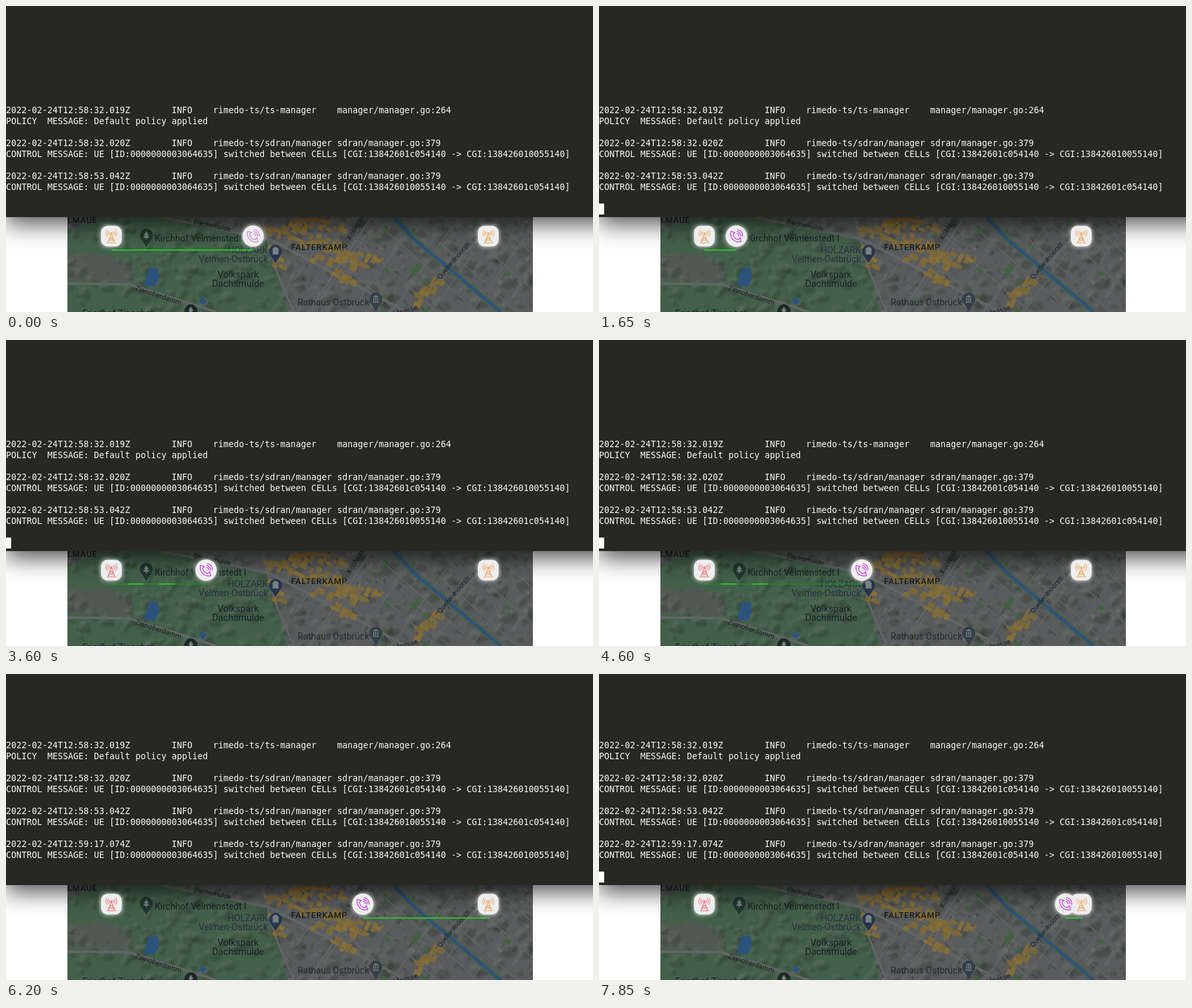
An HTML page with a canvas for the animation above (8 s loop, 908 by 474 pixels).

```html
<!DOCTYPE html>
<html lang="en">
<head>
<meta charset="utf-8">
<title>Handover demo</title>
<style>
html, body { margin: 0; width: 100%; height: 100%; overflow: hidden; background: #fff; }
canvas { position: absolute; left: 0; top: 0; }
#term {
  position: absolute; left: 0; top: 0; width: 908px; height: 327px;
  overflow: hidden; background: #272822; color: #f8f8f2;
  font: 13.3px/17px "DejaVu Sans Mono", monospace; white-space: pre;
}
#log { position: absolute; left: 0; }
#cursor { position: absolute; left: 0; top: 306px; width: 8px; height: 17px; background: #fff; }
</style>
</head>
<body>
<canvas id="stage" width="908" height="474"></canvas>
<div id="term"><div id="log"></div><div id="cursor"></div></div>
<script>
const LOOP = 8000, LOG_AT = 5350, SWITCH_AT = 5600;
const BEAT = 250, STEP = 24.25;
const LEFT = 163, RIGHT = 746, ICON_Y = 356.5, LINE_Y = 378;
const W = 908, H = 474, MAP_X = 95, MAP_Y = 327, MAP_R = 815;
const { PI, sin, cos, abs, min, floor } = Math;
const ctx = document.getElementById('stage').getContext('2d');
const log = document.getElementById('log');
const cursor = document.getElementById('cursor');

// ---------- terminal ----------
const A = '13842601c054140', B = '138426010055140';
const head = (time, mod, file) =>
  `2022-02-24T${time}Z`.padEnd(32) + 'INFO'.padEnd(8) + mod.padEnd(24) + file;
const moved = (time, from, to) => [
  head(time, 'rimedo-ts/sdran/manager', 'sdran/manager.go:379'),
  `CONTROL MESSAGE: UE [ID:0000000003064635] switched between CELLs [CGI:${from} -> CGI:${to}]`, ''
];
const before = [
  head('12:58:32.019', 'rimedo-ts/ts-manager', 'manager/manager.go:264'),
  'POLICY  MESSAGE: Default policy applied', '',
  ...moved('12:58:32.020', A, B),
  ...moved('12:58:53.042', B, A)
];
const after = [...before, ...moved('12:59:17.074', A, B)];

function showLog(lines) {
  if (log.lines === lines) return;
  log.lines = lines;
  log.style.top = 306 - lines.length * 17 + 'px';
  log.textContent = lines.join('\n');
}

// ---------- drawing helpers ----------
let seed = 11;
const rnd = (a = 0, b = 1) => {
  seed = (seed * 16807) % 2147483647;
  return a + (b - a) * seed / 2147483647;
};
function trace(c, pts) {
  c.beginPath();
  for (const [x, y] of pts) c.lineTo(x, y);
}
function line(c, color, width, ...pts) {
  trace(c, pts);
  c.strokeStyle = color;
  c.lineWidth = width;
  c.stroke();
}
function area(c, color, ...pts) {
  trace(c, pts);
  c.fillStyle = color;
  c.fill();
}
function block(c, color, x, y, w, h, turn) {
  c.save();
  c.translate(x, y);
  c.rotate(turn);
  c.fillStyle = color;
  c.fillRect(-w / 2, -h / 2, w, h);
  c.restore();
}

// ---------- map ----------
// Relief: every bump has a lit side and a shaded side.
function relief(c, n, x0, x1, size) {
  c.save();
  c.filter = 'blur(1.5px)';
  for (let i = 0; i < n; i++) {
    const x = rnd(x0, x1), y = rnd(MAP_Y, H), r = rnd(2, size), turn = rnd(-1, 1);
    for (const [d, color] of [[-r / 3, 'rgba(135,145,135,.16)'], [r / 3, 'rgba(20,28,22,.2)']]) {
      c.beginPath();
      c.ellipse(x + d, y + d, r, r * .6, turn, 0, 7);
      c.fillStyle = color;
      c.fill();
    }
  }
  c.restore();
}
function houses(c, n) {
  for (let i = 0; i < n; i++) {
    const g = rnd(74, 102);
    block(c, `rgb(${g},${g + 1},${g + 2})`, rnd(400, MAP_R), rnd(MAP_Y, H), rnd(3, 13), rnd(2, 6), .6 + (i % 2) * PI / 2);
  }
}
// A run of shop blocks scattered around a line.
function strip(c, x0, y0, x1, y1, spread, n) {
  for (let i = 0; i < n; i++) {
    const u = i / (n - 1);
    block(c, i % 3 ? '#7b683a' : '#846e3a', x0 + (x1 - x0) * u + rnd(-spread, spread),
      y0 + (y1 - y0) * u + rnd(-spread, spread), rnd(5, 15), rnd(4, 9), .45 + (i % 2) * PI / 2);
  }
}
function label(c, text, x, y, { size = 14, weight = 400, turn = 0, gap = 0, align = 'left', color = '#191d20' } = {}) {
  c.save();
  c.translate(x, y);
  c.rotate(turn * PI / 180);
  c.font = `${weight} ${size}px Roboto, sans-serif`;
  c.letterSpacing = gap + 'px';
  c.textAlign = align;
  c.fillStyle = color;
  c.fillText(text, 0, 0);
  c.restore();
}
function pin(c, x, y, color, glyph) {
  c.save();
  c.translate(x, y);
  c.beginPath();
  c.arc(0, 0, 10, PI * .85, PI * .15);
  c.quadraticCurveTo(6, 9, 0, 18);
  c.quadraticCurveTo(-6, 9, -8.9, 4.5);
  c.fillStyle = color;
  c.fill();
  const ink = '#76827f';
  c.fillStyle = c.strokeStyle = ink;
  if (glyph === 'bag') {
    c.fillRect(-4.5, -2, 9, 7);
    c.beginPath();
    c.arc(0, -2, 2.6, PI, 0);
    c.stroke();
  } else if (glyph === 'hall') {
    area(c, ink, [0, -6], [5, -3], [-5, -3]);
    for (let i = -4; i < 5; i += 3) c.fillRect(i, -2, 1.6, 5);
    c.fillRect(-5, 4, 10, 1.5);
  } else {
    area(c, ink, [0, -6], [4, 0], [-4, 0]);
    area(c, ink, [0, -2], [5, 4], [-5, 4]);
    c.fillRect(-.7, 4, 1.4, 3);
  }
  c.restore();
}

function buildMap() {
  const cv = document.createElement('canvas');
  cv.width = W;
  cv.height = H;
  const c = cv.getContext('2d');
  c.fillStyle = '#fff';
  c.fillRect(0, 0, W, H);
  c.save();
  c.beginPath();
  c.rect(MAP_X, MAP_Y, MAP_R - MAP_X, H - MAP_Y);
  c.clip();
  c.fillStyle = '#595b5c';
  c.fillRect(MAP_X, MAP_Y, MAP_R, H);

  houses(c, 420);
  area(c, '#43604a', [95, 348], [150, 327], [285, 327], [405, 364], [436, 474], [95, 474]);
  area(c, '#505a53', [95, 385], [150, 383], [200, 402], [190, 428], [95, 425]);
  relief(c, 190, MAP_X, 430, 10);
  relief(c, 110, 420, MAP_R, 13);
  for (let i = 0; i < 16; i++)
    block(c, '#40613f', rnd(450, MAP_R), rnd(MAP_Y, H), rnd(5, 14), rnd(4, 9), rnd(0, 2));

  // streets
  const street = '#626566';
  for (let x = 440; x < 800; x += 62) {
    line(c, street, 1.5, [x, MAP_Y], [x + 165, H]);
    line(c, street, 1.5, [x + 75, MAP_Y], [x - 30, H]);
  }
  line(c, street, 4, [240, 327], [407, 361], [620, 474]);
  line(c, street, 4, [95, 430], [190, 431], [325, 474]);
  line(c, street, 3, [395, 327], [418, 410], [445, 474]);
  line(c, street, 3, [565, 327], [468, 474]);
  line(c, street, 3, [735, 357], [622, 474]);

  // shops
  strip(c, 408, 350, 432, 350, 5, 8);
  strip(c, 412, 380, 423, 402, 6, 9);
  strip(c, 432, 343, 545, 398, 11, 48);
  strip(c, 445, 338, 520, 345, 5, 13);
  strip(c, 480, 388, 582, 398, 8, 20);
  strip(c, 512, 412, 535, 428, 6, 10);
  strip(c, 632, 456, 668, 428, 7, 15);
  line(c, '#8a5f2c', 5, [442, 335], [472, 330], [503, 335]);

  // water
  const water = '#2c527c', canal = [[600, 327], [630, 360], [765, 474]];
  area(c, water, [221, 406], [235, 406], [237, 422], [229, 435], [213, 433]);
  area(c, water, [301, 451], [312, 457], [305, 463], [299, 459]);
  line(c, '#4a5f4c', 9, ...canal);
  line(c, water, 4.5, ...canal);

  const shop = { align: 'right', color: '#272d40' };
  const park = { align: 'center', size: 14.5 };
  label(c, 'LMAUE', 95, 336, { size: 13, weight: 500, gap: .6 });
  label(c, 'Dachsmulde', 290, 338, { size: 10.5, turn: 11 });
  label(c, 'Kirchhof Velmenstedt I', 230, 365);
  label(c, 'HOLZARK', 405, 383, shop);
  label(c, 'Velmen-Ostbrück', 405, 397, shop);
  label(c, 'Volkspark', 359, 421, park);
  label(c, 'Dachsmulde', 359, 435, park);
  label(c, 'FALTERKAMP', 441, 378, { size: 13, weight: 500, gap: .7 });
  label(c, 'Rathaus Ostbrück', 451, 464, { color: '#23292d' });
  label(c, 'Zinnoberdamm', 199, 440, { size: 11, turn: 18 });
  label(c, 'Quellenmoorstr.', 672, 424, { size: 10.5, turn: -50 });
  label(c, 'Köblerstr.', 533, 363, { size: 11, turn: -60 });
  label(c, 'Torfgasse', 590, 484, { size: 11, turn: -16 });
  label(c, 'Friedhof Zinnober', 118, 481);

  pin(c, 217, 355, '#1f3730', 'tree');
  pin(c, 417, 380, '#26344f', 'bag');
  pin(c, 572, 454, '#343e47', 'hall');
  pin(c, 286, 472, '#1d2926', 'tree');
  c.restore();

  // window shadow
  c.shadowColor = 'rgba(0,0,0,.7)';
  c.shadowBlur = 34;
  c.shadowOffsetY = 10;
  c.fillStyle = '#272822';
  c.fillRect(0, 0, W + 60, MAP_Y);
  return cv;
}

// ---------- markers ----------
function badge(x, r, corner) {
  ctx.save();
  ctx.translate(x, ICON_Y);
  ctx.shadowColor = '#f4f4f4';
  ctx.shadowBlur = 7;
  ctx.fillStyle = '#eeeeee';
  ctx.beginPath();
  ctx.roundRect(-r, -r, r * 2, r * 2, corner);
  ctx.fill();
  ctx.shadowBlur = 0;
  ctx.lineCap = ctx.lineJoin = 'round';
}
function arc(x, y, r, a, b) {
  ctx.beginPath();
  ctx.arc(x, y, r, a, b);
  ctx.stroke();
}
function tower(x, color) {
  badge(x, 16, 10);
  line(ctx, color, 1.1, [-5.5, 10], [0, -4], [5.5, 10]);
  for (const s of [-1, 1]) {
    line(ctx, color, 1, [s * 1.8, 1], [-s * 3.2, 4.5], [s * 4.6, 8]);
    for (const r of [3.5, 6, 8.5]) arc(0, -4.5, r, PI / 2 - s * PI / 2 - .65, PI / 2 - s * PI / 2 + .65);
  }
  line(ctx, color, 1, [-7, 10.3], [7, 10.3]);
  ctx.fillStyle = color;
  ctx.beginPath();
  ctx.arc(0, -4.5, 1.5, 0, 7);
  ctx.fill();
  ctx.restore();
}
// Handset: a curved band that thickens towards both ends.
function handset() {
  const n = 24, outer = [], inner = [];
  for (let i = 0; i <= n; i++) {
    const u = i / n, a = (75 + 120 * u) * PI / 180, thick = 3.5 + 3 * abs(2 * u - 1) ** 4;
    const at = r => [4 + r * cos(a), -4 + r * sin(a)];
    outer.push(at(13));
    inner.unshift(at(13 - thick));
  }
  return [...outer, ...inner, outer[0]];
}
const receiver = handset();
function phone(x, color) {
  badge(x, 16.5, 16.5);
  line(ctx, color, 1.3, ...receiver);
  for (const r of [3.2, 6.2, 9.2]) arc(.5, -1, r, -1.45, .12);
  ctx.restore();
}

// ---------- timeline ----------
const map = buildMap();

// Beats counted from the hop at 950 ms; the first ones run slightly fast.
const hop = t => floor((t - 950 + min(100, t / 20)) / BEAT);

function link(x0, x1, color) {
  if (x1 > x0) line(ctx, color, 2, [x0, LINE_Y], [x1, LINE_Y]);
}
function cursorOn(t) {
  return t < LOG_AT ? t >= 550 : floor((t - LOG_AT) / 600) % 2 === 0;
}
function draw(t) {
  const k = hop(t), back = k >= 5;
  const x = LEFT + 1 + STEP * abs(k - 5);
  const bright = '#2bc22b';
  ctx.drawImage(map, 0, 0);

  if (t >= SWITCH_AT) {
    link(x, RIGHT + 2, bright);
  } else {
    link(LEFT, x, back ? '#23812a' : bright);
    if (back) for (const s of [1, 3]) link(LEFT + 1 + s * STEP, min(x, LEFT + 1 + (s + 1) * STEP), bright);
  }
  tower(LEFT, back ? '#ec7475' : '#eda862');
  tower(RIGHT, '#eda862');
  phone(x, t < 200 ? '#cf85dc' : '#c93fe0');

  showLog(t < LOG_AT ? before : after);
  cursor.style.visibility = cursorOn(t) ? 'visible' : 'hidden';
}

const start = performance.now();
function tick() {
  draw((performance.now() - start) % LOOP);
  requestAnimationFrame(tick);
}
tick();
</script>
</body>
</html>
```
